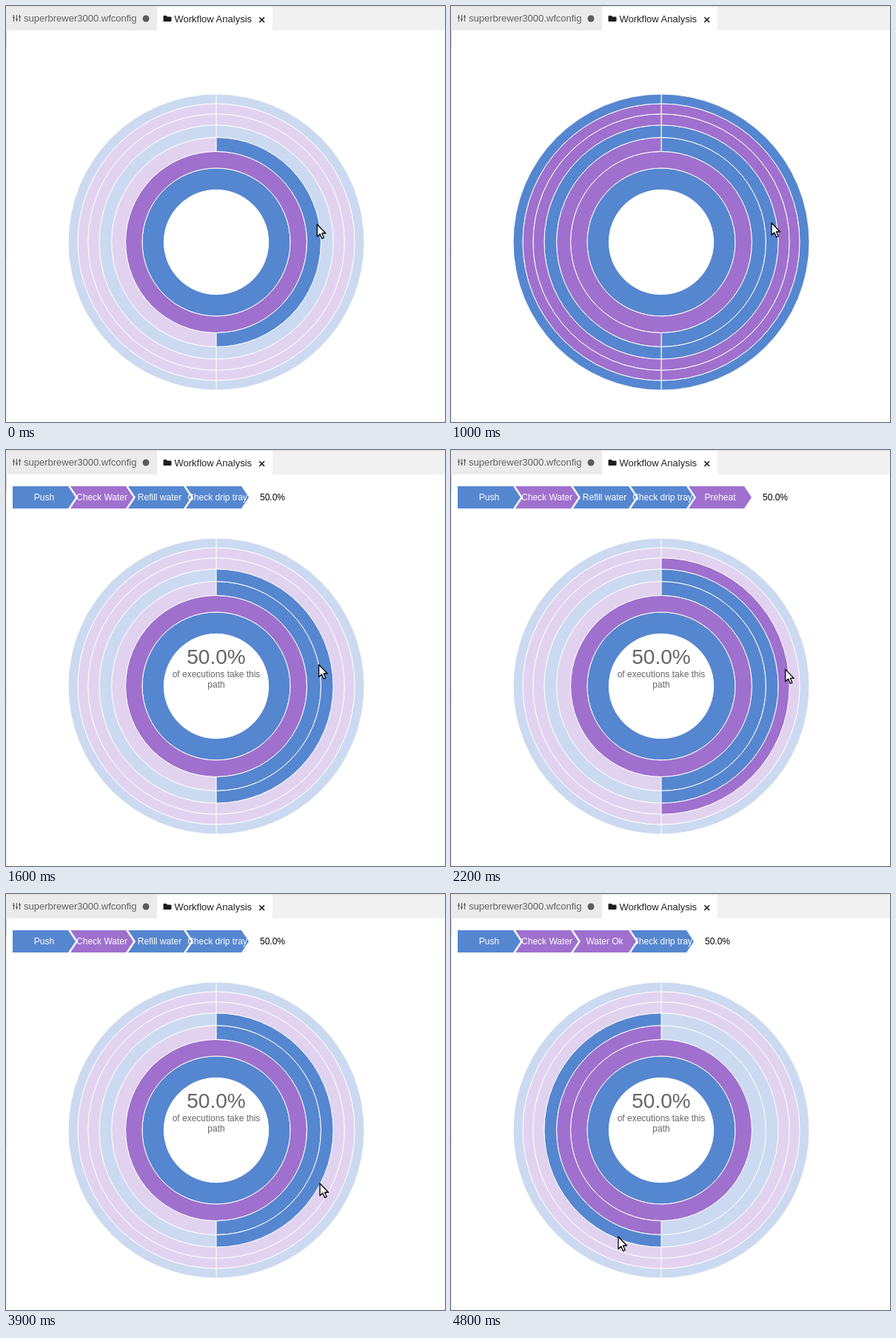
These frames come from a looping animation (593 by 562 pixels, 5600 ms). An HTML page:

```html
<!DOCTYPE html>
<html>
<head>
<meta charset="utf-8">
<title>Workflow Analysis</title>
<style>
html, body { margin: 0; width: 100%; height: 100%; overflow: hidden; background: #fff; }
svg { display: block; width: 593px; height: 562px; font-family: "Liberation Sans", Arial, sans-serif; }
</style>
</head>
<body>
<svg id="stage" viewBox="0 0 593 562">
  <rect width="593" height="562" fill="#fff"/>
  <rect width="593" height="33" fill="#f1f1f1"/>
  <rect width="204" height="33" fill="#ebebeb"/>
  <rect x="204" width="156" height="33" fill="#fff"/>
  <rect width="593" height="1" fill="#dcdcdc"/>
  <rect y="33" width="1" height="529" fill="#ececec"/>
  <rect y="33" width="1" height="23" fill="#d4d4d4"/>
  <rect y="320" width="1" height="22" fill="#dfdff5"/>

  <g stroke="#616161" stroke-width="1.2">
    <path d="M10.5 12V21M14.5 12V21M18.5 12V21"/>
    <path d="M9 15.5H12M13 18H16M17 14.5H20" stroke-width="1.6"/>
  </g>
  <text x="24" y="21" font-size="13" fill="#616161">superbrewer3000.wfconfig</text>
  <circle cx="189" cy="17" r="4.5" fill="#5c5c5c"/>
  <path d="M212.500 14q0-1 1-1h3l1.500 1.500h4.500q1 0 1 1v4.500q0 1-1 1h-9q-1 0-1-1z" fill="#1e1e1e"/>
  <text x="227.500" y="22" font-size="13" fill="#222">Workflow Analysis</text>
  <path d="M342.300 15.200l6.700 6.700M349 15.200l-6.700 6.700" stroke="#1e1e1e" stroke-width="1.6"/>

  <g id="rings" stroke="#fff" stroke-width="1" fill-rule="evenodd"></g>

  <g id="info" text-anchor="middle" fill="#666">
    <text x="284" y="289" font-size="28">50.0%</text>
    <text x="284" y="307" font-size="12">of executions take this</text>
    <text x="284" y="321" font-size="12">path</text>
  </g>

  <clipPath id="trailClip"><rect width="550" height="50"/></clipPath>
  <g transform="translate(9 49)">
    <g id="trail" clip-path="url(#trailClip)" font-size="12" text-anchor="middle"></g>
  </g>

  <path id="cursor" d="M0 0V16.500L3.800 13L6.600 19.200L9.200 18L6.500 12H11.500Z"
        fill="#fff" stroke="#000" stroke-width="1.3" stroke-linejoin="round"/>
</svg>
<script>
const LOOP = 5600, STEP = 100, DIM = 0.3;
const FADE_END = 975, HOVER_START = 1100;
const CX = 284, CY = 319, R = 200, LEVELS = 8;
const BLUE = '#5586d0', PURPLE = '#9f70ce';
const CRUMB = { w: 75, h: 30, gap: 3, tip: 10 };

const rest = [['Check drip tray', BLUE], ['Preheat', PURPLE], ['Brew', PURPLE], ['Drink', BLUE]];
const start = [['Push', BLUE], ['Check Water', PURPLE]];
const paths = {
  right: [...start, ['Refill water', BLUE], ...rest],
  left: [...start, ['Water Ok', PURPLE], ...rest]
};

// time, x, y of the pointer
const track = [
  [0, 420.3, 295], [600, 420.3, 295], [1000, 433, 293], [1100, 438, 292],
  [1200, 438, 292], [1300, 446, 292], [1400, 436, 291], [1500, 420, 290],
  [1600, 422.6, 290], [1700, 422.6, 290], [1800, 426, 291], [1900, 434, 293],
  [2000, 443, 295], [2300, 456, 297], [2500, 466, 286], [2600, 466, 286],
  [2700, 471, 286], [2800, 473, 286], [3500, 473, 286], [3600, 464, 305],
  [3700, 448, 350], [3800, 448, 350], [3900, 424, 391], [4000, 404, 416],
  [4100, 375, 440], [4200, 335, 462], [4300, 292, 472], [4400, 250, 474],
  [4500, 244, 474], [4600, 238, 470], [4700, 232, 466], [4800, 226, 463],
  [LOOP, 226, 463]
];

const $ = id => document.getElementById(id);

function add(parent, tag, attrs, text) {
  const el = document.createElementNS('http://www.w3.org/2000/svg', tag);
  for (const key in attrs) el.setAttribute(key, attrs[key]);
  if (text) el.textContent = text;
  parent.appendChild(el);
  return el;
}

const radius = level => R * Math.sqrt(level / LEVELS);

function arcPath(level, side) {
  const a = radius(level), b = radius(level + 1);
  if (side) {
    const s = side === 'right' ? 1 : 0;
    return `M${CX} ${CY - b}A${b} ${b} 0 0 ${s} ${CX} ${CY + b}` +
      `V${CY + a}A${a} ${a} 0 0 ${1 - s} ${CX} ${CY - a}Z`;
  }
  const circle = r => `M${CX} ${CY - r}A${r} ${r} 0 0 1 ${CX} ${CY + r}A${r} ${r} 0 0 1 ${CX} ${CY - r}Z`;
  return circle(b) + circle(a);
}

const arcs = [];
function addArc(level, side) {
  const fill = paths[side || 'right'][level - 1][1];
  const el = add($('rings'), 'path', { d: arcPath(level, side), fill });
  arcs.push({ el, level, side });
}
addArc(1);
addArc(2);
for (const side of ['right', 'left'])
  for (let level = 3; level < LEVELS; level++) addArc(level, side);

// The crumb that differs on the left lies above its neighbours.
const crumbs = [];
function addCrumb(side, i) {
  const { w, h, gap, tip } = CRUMB;
  const [name, fill] = paths[side][i];
  const g = add($('trail'), 'g', { transform: `translate(${i * (w + gap)} 0)` });
  const notch = i ? `L${tip} ${h / 2}` : '';
  add(g, 'path', { d: `M0 0H${w}L${w + tip} ${h / 2}L${w} ${h}H0${notch}Z`, fill });
  add(g, 'text', { x: (w + tip) / 2, y: h / 2, dy: '0.35em', fill: '#fff' }, name);
  crumbs.push({ el: g, side, i });
}
for (let i = 0; i < 7; i++) addCrumb('right', i);
for (const i of [0, 1, 3, 4, 5, 6, 2]) addCrumb('left', i);
const share = add($('trail'), 'text', { y: CRUMB.h / 2, dy: '0.35em', fill: '#000' }, '50.0%');

const show = (el, on) => el.setAttribute('display', on ? 'inline' : 'none');

function pointer(t) {
  const i = track.findIndex(p => p[0] > t);
  const [t0, x0, y0] = track[i - 1], [t1, x1, y1] = track[i];
  const k = (t - t0) / (t1 - t0);
  return [x0 + (x1 - x0) * k, y0 + (y1 - y0) * k];
}

const cubicInOut = u => u < 0.5 ? 4 * u ** 3 : 1 - 4 * (1 - u) ** 3;

function draw(time) {
  const t = Math.floor((time % LOOP) / STEP) * STEP;
  const [x, y] = pointer(t);
  const hover = t >= HOVER_START;
  const side = x < CX ? 'left' : 'right';
  const depth = Math.floor(LEVELS * ((x - CX) ** 2 + (y - CY) ** 2) / R ** 2);
  const u = Math.min(1, t / FADE_END);
  const faded = hover ? DIM : DIM + (1 - DIM) * cubicInOut(u);

  for (const a of arcs) {
    const lit = a.level <= depth && (!a.side || a.side === side);
    // Until hovering starts, the first three rings on the right stay lit.
    const first = a.level <= 3 && a.side !== 'left';
    a.el.setAttribute('opacity', (hover ? lit : first) ? 1 : faded);
  }
  for (const c of crumbs) show(c.el, hover && c.side === side && c.i < depth);
  share.setAttribute('x', (depth + 0.5) * (CRUMB.w + CRUMB.gap));
  show(share, hover);
  show($('info'), hover);
  $('cursor').setAttribute('transform', `translate(${x} ${y})`);
}

const began = performance.now();
function tick() {
  draw(performance.now() - began);
  requestAnimationFrame(tick);
}
tick();
</script>
</body>
</html>
```
